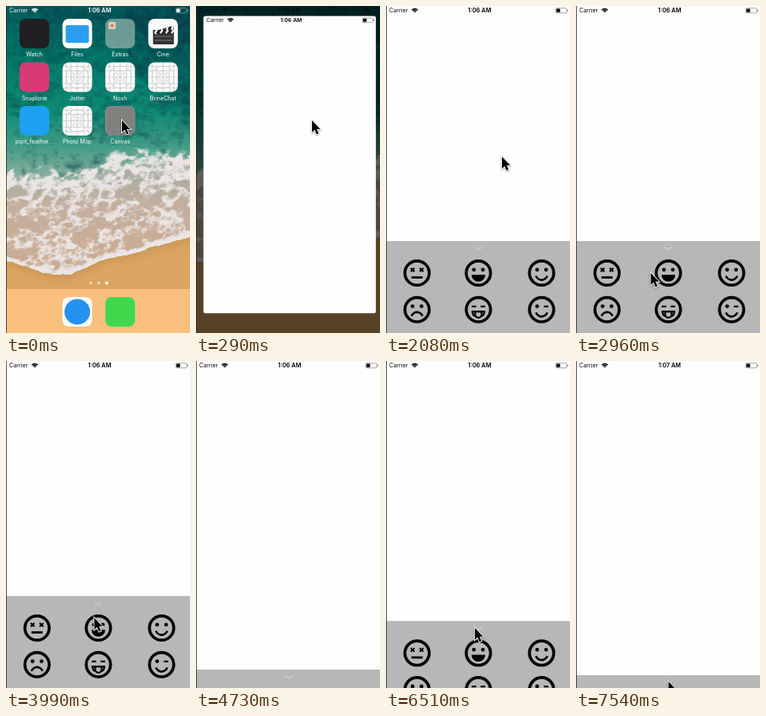
An HTML page with a canvas that plays this animation: 230 by 409 pixels, repeating every 8 s.

```html
<!DOCTYPE html>
<html lang="en">
<head>
<meta charset="utf-8">
<title>Tray demo</title>
<style>
html, body { margin: 0; width: 100%; height: 100%; overflow: hidden; background: #fff; }
canvas { display: block; width: 230px; height: 409px; }
</style>
</head>
<body>
<canvas id="stage"></canvas>
<script>
const W = 230, H = 409, LOOP = 8000, FRAME = 146, TAU = Math.PI * 2;
const canvas = document.getElementById('stage');
const ratio = window.devicePixelRatio || 1;
canvas.width = W * ratio;
canvas.height = H * ratio;
const ctx = canvas.getContext('2d');

const clamp = v => Math.max(0, Math.min(1, v));
const smooth = v => { v = clamp(v); return v * v * (3 - 2 * v); };
const lerp = (a, b, u) => a + (b - a) * u;
const mix = (a, b, u) => a.map((v, i) => lerp(v, b[i], u));

// Piecewise linear lookup; stops are [position, number or colour].
function along(stops, x) {
  let i = 1;
  while (i < stops.length - 1 && x > stops[i][0]) i++;
  const [x0, a] = stops[i - 1], [x1, b] = stops[i], u = clamp((x - x0) / (x1 - x0));
  return Array.isArray(a) ? mix(a, b, u) : lerp(a, b, u);
}

// ---- Motion: each segment is [start, step count, value at progress u] ----
function track(t, initial, segments) {
  let value = initial;
  for (const [start, count, at] of segments) {
    if (t < start) break;
    value = at(Math.min(count, 1 + Math.floor((t - start) / FRAME + .06)) / count);
  }
  return value;
}
const pick = (...values) => u => values[Math.round(u * values.length) - 1];

const launchMoves = [[140, 4, u => u === 1 ? 1 : 1 - (1 + 8.5 * u) * Math.exp(-8.5 * u)]];
const fadeMoves = [[1030, 3, pick(.47, .94, 1)]];
const trayMoves = [
  [4730, 3, pick(386, 286, 294)],
  [6210, 8, u => 294 + 99 * smooth(u)]
];
const cursorMoves = [
  [2080, 8, u => [145 - 80 * u ** 3.3, 143 + 194 * (1 - (1 - u) ** 2)]],
  [3250, 1, () => [63.8, 337.5]],
  [3550, 5, u => [63.8 + 52 * smooth(u), 337.5 - 33 * u * u + 30 * u * (1 - u)]],
  [4730, 3, u => [131, 360 + 120 * (1 - u)]],
  [5320, 5, u => [114.8 + 17 * (1 - u) ** 2, 304.7 + 55 * (1 - u) ** 2]],
  [6210, 8, u => [114.8 - 10 * u, 304.7 + 92 * smooth(u)]],
  [7390, 2, u => [104.5 + 11 * u, 396.7 + 4 * u]]
];

// ---- Drawing helpers ----
function box(x, y, w, h, r, fill) {
  ctx.beginPath();
  ctx.roundRect(x, y, w, h, r);
  ctx.fillStyle = fill;
  ctx.fill();
}
function disc(x, y, r, fill) {
  ctx.beginPath();
  ctx.arc(x, y, r, 0, TAU);
  ctx.fillStyle = fill;
  ctx.fill();
}
function line(points, width, color) {
  ctx.beginPath();
  points.forEach(([x, y]) => ctx.lineTo(x, y));
  ctx.lineWidth = width;
  ctx.strokeStyle = color;
  ctx.stroke();
}
function arc(x, y, r, from, to, width, color) {
  ctx.beginPath();
  ctx.arc(x, y, r, from, to);
  ctx.lineWidth = width;
  ctx.strokeStyle = color;
  ctx.stroke();
}
function text(label, x, y, size, color, align = 'center', weight = 400) {
  ctx.font = `${weight} ${size}px Inter, sans-serif`;
  ctx.textAlign = align;
  ctx.textBaseline = 'alphabetic';
  ctx.fillStyle = color;
  ctx.fillText(label, x, y);
}
function layer(alpha, draw) {
  ctx.save();
  ctx.globalAlpha *= alpha;
  draw();
  ctx.restore();
}

// ---- Beach wallpaper, built once from value noise ----
function hash(x, y) {
  const s = Math.sin(x * 127.1 + y * 311.7) * 43758.5453;
  return s - Math.floor(s);
}
function noise(x, y) {
  const ix = Math.floor(x), iy = Math.floor(y), u = smooth(x - ix), v = smooth(y - iy);
  return lerp(lerp(hash(ix, iy), hash(ix + 1, iy), u),
    lerp(hash(ix, iy + 1), hash(ix + 1, iy + 1), u), v);
}
const fbm = (x, y) =>
  .5 * noise(x, y) + .26 * noise(x * 2, y * 2) + .15 * noise(x * 4, y * 4) + .09 * noise(x * 8, y * 8);

function makeBeach() {
  const beach = document.createElement('canvas');
  beach.width = W;
  beach.height = H;
  const pen = beach.getContext('2d'), image = pen.createImageData(W, H);
  const sea = [[0, [2, 98, 96]], [60, [2, 118, 104]], [130, [14, 140, 116]],
    [175, [66, 155, 134]], [215, [140, 178, 160]]];
  const wash = [[210, [168, 174, 160]], [250, [196, 174, 158]], [320, [202, 172, 146]]];
  const shoreLine = [[0, 317], [45, 333], [80, 337], [125, 317], [180, 302], [230, 289]];
  const bump = (d, size) => Math.exp(-((d / size) ** 2));
  for (let y = 0; y < H; y++) for (let x = 0; x < W; x++) {
    const n = fbm(x / 28, y / 20), fine = fbm(x / 7 + 9, y / 5);
    const surf = 205 - 22 * smooth((x - 50) / 90) + (n - .5) * 36;
    const shore = along(shoreLine, x) + (n - .5) * 9;
    const dark = (1 - y / 190) * (.25 + .5 * smooth((x - 90) / 130)) + (n + fine - 1) * .9;
    let color = mix(along(sea, y), [4, 62, 74], clamp(dark));
    if (y >= shore) {
      color = mix([219, 164, 96], [190, 138, 84], .4 * bump(y - shore, 8));
    } else if (y > surf) {
      const ridge = 1 - Math.abs(2 * fbm(x / 17 + y / 50 + 40, y / 13) - 1);
      const crest = .22 * bump(y - surf - 18, 16) + .5 * bump(y - shore + 2, 4);
      const foam = smooth((ridge + crest + (fine - .5) * .7 - .68) / .4);
      color = mix(color, along(wash, y), smooth((y - surf) / 35));
      color = mix(color, [234, 229, 228], foam * smooth((y - surf) / 8 + .2));
    }
    image.data.set([...color, 255], (y * W + x) * 4);
  }
  pen.putImageData(image, 0, 0);
  return beach;
}
const beach = makeBeach();

// ---- Home screen ----
const SIZE = 37;
function blueprint(x, y) {
  const c = SIZE / 2, ink = '#b0b0b0';
  ctx.save();
  box(x, y, SIZE, SIZE, 8, '#fdfdfd');
  ctx.clip();
  ctx.translate(x, y);
  for (const d of [5, 10.5, c, 26.5, 32]) {
    line([[d, 0], [d, SIZE]], .5, ink);
    line([[0, d], [SIZE, d]], .5, ink);
  }
  line([[0, 0], [SIZE, SIZE]], .4, ink);
  line([[SIZE, 0], [0, SIZE]], .4, ink);
  for (const r of [5, 8, 14]) arc(c, c, r, 0, TAU, .5, ink);
  ctx.restore();
}
const tile = (fill, detail) => (x, y) => {
  box(x, y, SIZE, SIZE, 8, fill);
  if (detail) detail(x, y);
};
function clapper(x, y) {
  box(x + 6, y + 17, 26, 15, 1, '#333');
  for (const [dy, turn] of [[16, -.28], [14, 0]]) {
    ctx.save();
    ctx.translate(x + 6, y + dy);
    ctx.rotate(turn);
    box(0, 0, 26, 4, 0, '#222');
    for (let i = 2; i < 26; i += 7) line([[i, 4], [i + 3, 0]], 2.4, '#eee');
    ctx.restore();
  }
  for (const dy of [22, 27]) line([[x + 8, y + dy], [x + 30, y + dy]], .6, '#aaa');
}
const folder = tile('rgba(150,180,172,.72)', (x, y) => {
  box(x + 4, y + 4, 9, 9, 2, '#d8d4cc');
  disc(x + 8.5, y + 8.5, 2.3, '#dd8350');
});
const apps = [
  ['Watch', tile('#202022')],
  ['Files', tile('#fcfcfc', (x, y) => box(x + 4, y + 8, 29, 22, 2, '#2a9df0'))],
  ['Extras', folder],
  ['Cine', tile('#fafafa', clapper)],
  ['Snaplorie', tile('#d83a76')],
  ['Jotter', blueprint],
  ['Nosh', blueprint],
  ['BrineChat', blueprint],
  ['pipit_feather...', tile('#1da1f2')],
  ['Photo Map', blueprint],
  ['Canvas', (x, y) => { blueprint(x, y); box(x, y, SIZE, SIZE, 8, 'rgba(110,110,106,.85)'); }]
];

function icons() {
  box(0, 354, W, 55, 0, 'rgba(255,196,132,.83)');
  apps.forEach(([label, draw], i) => {
    const x = 17 + i % 4 * 53.6, y = 16 + Math.floor(i / 4) * 54.5;
    draw(x, y);
    text(label, x + SIZE / 2, y + 47, 7.1, '#fff');
  });
  [106, 116, 126].forEach((x, i) => disc(x, 346.5, 2, i === 2 ? '#fff' : 'rgba(255,255,255,.5)'));
  tile('#fafafa', (x, y) => disc(x + 18.5, y + 18.5, 16, '#2492ee'))(70.6, 364);
  tile('#3fd84c')(124.2, 364);
}

function statusBar(clock, color) {
  text('Carrier', 4, 8.2, 7.1, color, 'left');
  for (const r of [2.2, 4, 5.8]) arc(36, 8.6, r - .6, -Math.PI * .76, -Math.PI * .24, 1.3, color);
  text(clock, 117, 8.2, 7.3, color, 'center', 600);
  layer(.6, () => {
    ctx.beginPath();
    ctx.roundRect(212, 2.7, 14, 6, 1.5);
    ctx.lineWidth = .6;
    ctx.strokeStyle = color;
    ctx.stroke();
    box(226.6, 4.6, 1, 2.2, .5, color);
  });
  box(213, 3.6, 4.6, 4.2, .5, color);
}

// ---- Canvas app ----
const INK = '#000';
const eyes = {
  dot: x => disc(x, -4.2, 2.4, INK),
  shut: x => line([[x - 2.8, -4], [x + 2.8, -4]], 2.2, INK),
  cross: x => {
    line([[x - 2.3, -6.3], [x + 2.3, -1.7]], 2, INK);
    line([[x + 2.3, -6.3], [x - 2.3, -1.7]], 2, INK);
  }
};
const mouths = {
  flat: () => line([[-7, 5.5], [7, 5.5]], 2.8, INK),
  smile: () => arc(0, 1, 7.6, .35, Math.PI - .35, 2.6, INK),
  frown: () => arc(0, 10.5, 7.4, Math.PI + .35, TAU - .35, 2.6, INK),
  open: () => {
    ctx.beginPath();
    ctx.arc(0, 2.2, 8.6, 0, Math.PI);
    ctx.fill();
  },
  tongue: () => {
    line([[-8.6, 2.4], [8.6, 2.4]], 2.4, INK);
    arc(0, 2.4, 7.4, 0, Math.PI * .3, 2.2, INK);
    arc(0, 2.4, 7.4, Math.PI * .7, Math.PI, 2.2, INK);
    arc(0, 6, 4, 0, Math.PI, 2.2, INK);
    line([[-4, 2], [-4, 6]], 2.2, INK);
    line([[4, 2], [4, 6]], 2.2, INK);
  }
};
const faces = [
  ['cross', 'cross', 'flat'], ['dot', 'dot', 'open'], ['dot', 'dot', 'smile'],
  ['dot', 'dot', 'frown'], ['shut', 'shut', 'tongue'], ['dot', 'shut', 'smile']
];
const columns = [38.8, 115.5, 194.5];

function tray() {
  box(0, 0, W, H, 0, '#b7b7b7');
  line([[110.5, 7.5], [115.5, 11], [120.5, 7.5]], 1.8, '#c9c9c9');
  faces.forEach(([left, right, mouth], i) => {
    ctx.save();
    ctx.translate(columns[i % 3], 40 + Math.floor(i / 3) * 45.8);
    arc(0, 0, 15.2, 0, TAU, 3.7, INK);
    eyes[left](-5.6);
    eyes[right](5.6);
    mouths[mouth]();
    ctx.restore();
  });
}

function cursor([x, y]) {
  ctx.save();
  ctx.translate(x, y);
  ctx.beginPath();
  [[0, 0], [0, 15], [3.4, 11.8], [5.8, 17.4], [8.3, 16.3], [5.9, 10.9], [10.4, 10.9]]
    .forEach(([px, py]) => ctx.lineTo(px, py));
  ctx.closePath();
  ctx.lineWidth = 1.8;
  ctx.strokeStyle = '#fff';
  ctx.shadowColor = 'rgba(0,0,0,.5)';
  ctx.shadowBlur = 2 * ratio;
  ctx.shadowOffsetY = .6 * ratio;
  ctx.stroke();
  ctx.shadowColor = 'transparent';
  ctx.fillStyle = '#000';
  ctx.fill();
  ctx.restore();
}

function home(open, card) {
  ctx.drawImage(beach, 0, 0, W, H);
  layer(clamp(1 - open * 1.3), () => {
    ctx.translate(card.x + card.w / 2, card.y + card.h / 2);
    ctx.scale(card.w / SIZE, card.w / SIZE);
    ctx.translate(-142.7, -143.5);
    icons();
  });
  box(0, 0, W, H, 0, `rgba(0,0,0,${.65 * open})`);
  statusBar('1:06 AM', open ? 'rgba(0,0,0,.5)' : '#fff');
}

function app(t, open, card) {
  layer(clamp(open * 3), () => {
    box(card.x, card.y, card.w, card.h, 3 * Math.min(1, 12 * (1 - open)), '#fefefe');
    ctx.clip();
    ctx.translate(card.x, card.y);
    ctx.scale(card.w / W, card.w / W);
    statusBar(t < 6660 ? '1:06 AM' : '1:07 AM', '#000');
    const shown = track(t, 0, fadeMoves);
    if (!shown) return;
    ctx.translate(0, track(t, 294, trayMoves));
    tray();
    box(0, 0, W, H, 0, `rgba(254,254,254,${1 - shown})`);
  });
}

function render(now) {
  const t = now % LOOP;
  const open = track(t, 0, launchMoves), tall = open ** 1.35;
  const card = {
    x: lerp(124.2, 0, open), y: lerp(125, 0, tall),
    w: lerp(SIZE, W, open), h: lerp(SIZE, H, tall)
  };
  ctx.setTransform(ratio, 0, 0, ratio, 0, 0);
  if (open < 1) home(open, card);
  if (open > 0) app(t, open, card);
  box(0, 0, 1, H, 0, 'rgba(40,40,40,.8)');
  cursor(track(t, [145, 143], cursorMoves));
}

const began = performance.now();
function tick() {
  render(performance.now() - began);
  requestAnimationFrame(tick);
}
tick();
</script>
</body>
</html>
```
